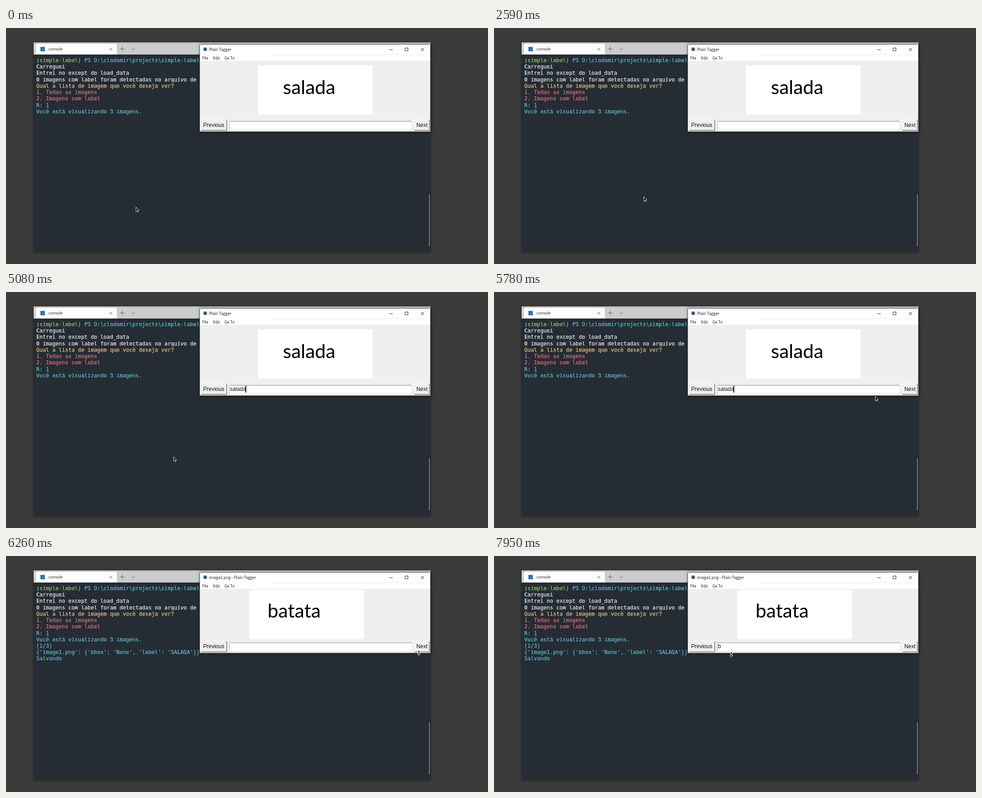
An HTML page that plays this animation: 1066x525 px, repeating every 8000 ms.

```html
<!DOCTYPE html>
<html lang="pt">
<head>
<meta charset="utf-8">
<title>Console</title>
<style>
  html, body { margin: 0; width: 100%; height: 100%; overflow: hidden; background: #3b3b3b; }
  svg { display: block; position: absolute; left: 0; top: 0; }
  text { white-space: pre; }
  .mono { font: 11.78px "DejaVu Sans Mono", monospace; stroke-width: .2; }
  .ui { font: 8.7px "Open Sans", sans-serif; fill: #111; }
  .menu { font-size: 8.4px; }
  .tk { font: 12px "Liberation Sans", Arial, sans-serif; fill: #111; }
  .word { font: 42.6px Lato, sans-serif; fill: #000; }
  .line { fill: none; stroke: #222; }
  .thin { fill: none; stroke: #555; stroke-width: .9; }
  .shadow { filter: drop-shadow(0 1px 3px rgba(0, 0, 0, .45)); }
</style>
</head>
<body>
<svg width="1066" height="525" viewBox="0 0 1066 525">
  <rect class="shadow" x="61" y="32" width="878" height="465" fill="#262c34"/>
  <rect x="61" y="32" width="878" height="27" fill="#cbcdcd"/>
  <rect x="61" y="32" width="878" height="4" fill="#c7c2c5"/>
  <path d="M66 59V38q0-3 3-3H242q3 0 3 3V59z" fill="#fff"/>
  <rect x="76" y="42" width="10" height="10" fill="#2f74c0"/>
  <text class="ui" x="94" y="50.3">console</text>
  <path class="thin" d="M228.5 44l6.5 6.5M235 44l-6.5 6.5M252 46.5h10M257 41.5v10M277.5 45l4 4 4-4"/>
  <rect x="935.6" y="370" width="1.6" height="115" fill="#85888c"/>
  <g id="lines" class="mono"></g>

  <rect id="frame" class="shadow" x="428.5" y="36.5" width="510" fill="#efefef" stroke="#64666a"/>
  <rect x="429" y="37" width="509" height="36" fill="#fff"/>
  <path d="M584 59.5H938" stroke="#e9e9e9"/>
  <circle cx="440.5" cy="47.3" r="4" fill="#2c5d80"/>
  <text class="ui" id="title" x="449.3" y="51"></text>
  <path class="line" d="M848 48.5h7M882.5 44.5h6.5v6.5h-6.5zM917.5 44.5l7 7M924.5 44.5l-7 7"/>
  <g class="ui">
    <text class="menu" x="434" y="69.5">File</text>
    <text class="menu" x="458" y="69.5">Edit</text>
    <text class="menu" x="483" y="69.5">Go To</text>
  </g>

  <g id="picture">
    <rect width="253.5" height="109.5" fill="#fff"/>
    <text class="word" id="word"></text>
  </g>

  <g id="bar">
    <path d="M431 228V204h58" fill="none" stroke="#fcfcfc"/>
    <path d="M431 227.7H488.3V204" fill="none" stroke="#707070" stroke-width="1.4"/>
    <text class="tk" x="436" y="220">Previous</text>
    <rect x="494" y="207" width="403" height="18" fill="#fff"/>
    <path d="M494.3 225V208" stroke="#b4b4b4"/>
    <path d="M494 207.6H897" stroke="#858585"/>
    <text class="tk" id="entry" x="495.2" y="220"></text>
    <rect id="caret" y="208.3" width="1.7" height="15.4" fill="#000"/>
    <path id="nextLight" d="M903 228V204h34" fill="none" stroke="#fcfcfc"/>
    <path id="nextDark" d="M903 227.7H936.3V204" fill="none" stroke="#707070" stroke-width="1.4"/>
    <text class="tk" id="next" x="907.6" y="220">Next</text>
  </g>

  <g id="pointer" stroke="#fff" stroke-width=".9" stroke-linejoin="round">
    <path id="arrow" d="M.5 .5V10.2L2.7 8.2 4.2 11.4 5.6 10.8 4.2 7.6H7z"/>
    <path id="resize" d="M0-6 3.3-2.4H.9V2.4H3.3L0 6-3.3 2.4H-.9V-2.4H-3.3z"/>
  </g>
</svg>
<script>
const LOOP = 8000, STEP = 78;
const PRESS = 5950, RELEASE = 6100, SIZING = 6180, SWAP = 6260;
const CYAN = '#5cc2d4', WHITE = '#f0f1f3', GREEN = '#9bcb80', YELLOW = '#eec67e', RED = '#e96d77';
const $ = id => document.getElementById(id);

const ENV = '(simple-label)';
const output = [
  [CYAN, String.raw` PS D:\clodomir\projects\simple-label`],
  [WHITE, 'Carreguei'],
  [WHITE, 'Entrei no except do load_data'],
  [WHITE, '0 imagens com label foram detectadas no arquivo de'],
  [YELLOW, 'Qual a lista de imagem que você deseja ver?'],
  [RED, '1. Todas as imagens'],
  [RED, '2. Imagens sem label'],
  [CYAN, 'R: 1'],
  [CYAN, 'Você está visualizando 3 imagens.'],
  [CYAN, '[1/3]'],
  [CYAN, "{'image1.png': {'bbox': 'None', 'label': 'SALADA'}}"],
  [CYAN, 'Salvando']
];
const FIRST_LINES = 9;

const scenes = [
  { title: 'Plain Tagger', word: 'salada', height: 194, lift: 0, x: 557, y: 83.2, tx: 55.5, ty: 63.8 },
  { title: 'image2.png - Plain Tagger', word: 'batata', height: 179.4, lift: -14.6, x: 538, y: 75.7, tx: 40.5, ty: 61.8 }
];

// Pointer moves: each is a quadratic curve over [from, to].
const moves = [
  { from: 420, to: 660, pts: [[287, 398], [303, 394], [319, 386]] },
  { from: 732, to: 1110, pts: [[319, 386], [331, 375], [331, 375]] },
  { from: 5000, to: 5860, pts: [[331, 375], [540, 330], [910, 210]] },
  { from: SIZING - STEP, to: SIZING, pts: [[910, 210], [910, 210], [913, 216]] },
  { from: 6332, to: 6800, pts: [[913, 216], [620, 138], [501, 184]] },
  { from: 6800, to: 7190, pts: [[501, 184], [508, 240], [525, 219]] }
];

function pointerAt(t) {
  const { from, to, pts: [a, b, c] } = moves.findLast(m => m.from <= t) || moves[0];
  const steps = Math.max(0, Math.floor((t - from) / STEP));
  const u = t >= to ? 1 : steps * STEP / (to - from), v = 1 - u;
  return [0, 1].map(i => v * v * a[i] + 2 * u * v * b[i] + u * u * c[i]);
}

const keyTimes = [3300, 3370, 3600, 3760, 4000, 4230];
function typedAt(t) {
  if (t >= RELEASE) return t >= 7880 ? 'b' : '';
  return 'salada'.slice(0, keyTimes.filter(k => k <= t).length);
}

const caretOn = t => t >= 190 && (t - 190) % 894 < 606;

function svgText(tag, fill, str) {
  const el = document.createElementNS('http://www.w3.org/2000/svg', tag);
  el.setAttribute('fill', fill);
  el.setAttribute('stroke', fill);
  el.textContent = str;
  return el;
}

const lines = output.map(([color, str], i) => {
  const el = svgText('text', color, str);
  el.setAttribute('x', 67);
  el.setAttribute('y', 75.9 + i * 14.23);
  $('lines').append(el);
  return el;
});
lines[0].prepend(svgText('tspan', GREEN, ENV));

const move = (el, x, y) => el.setAttribute('transform', `translate(${x} ${y})`);
const show = (el, on) => el.setAttribute('visibility', on ? 'visible' : 'hidden');

function setScene({ title, word, height, lift, x, y, tx, ty }) {
  $('title').textContent = title;
  $('frame').setAttribute('height', height);
  move($('bar'), 0, lift);
  move($('picture'), x, y);
  $('word').textContent = word;
  $('word').setAttribute('x', tx);
  $('word').setAttribute('y', ty);
}

function setButton(pressed) {
  $('nextLight').setAttribute('stroke', pressed ? '#707070' : '#fcfcfc');
  $('nextDark').setAttribute('stroke', pressed ? '#fcfcfc' : '#707070');
  move($('next'), +pressed, +pressed);
}

function draw(t) {
  setScene(scenes[t >= SWAP ? 1 : 0]);
  setButton(t >= PRESS && t < RELEASE);
  lines.forEach((el, i) => show(el, i < FIRST_LINES || t >= RELEASE));

  const entry = $('entry'), str = typedAt(t);
  entry.textContent = str;
  const width = str ? entry.getComputedTextLength() : 0;
  $('caret').setAttribute('x', Math.max(495, 494.2 + width));
  show($('caret'), caretOn(t));

  const sizing = (t >= SIZING && t < 6410) || t >= 7040;
  move($('pointer'), ...pointerAt(t));
  show($('arrow'), !sizing);
  show($('resize'), sizing);
}

const start = performance.now();
function tick() {
  draw((performance.now() - start) % LOOP);
  requestAnimationFrame(tick);
}
tick();
</script>
</body>
</html>
```
